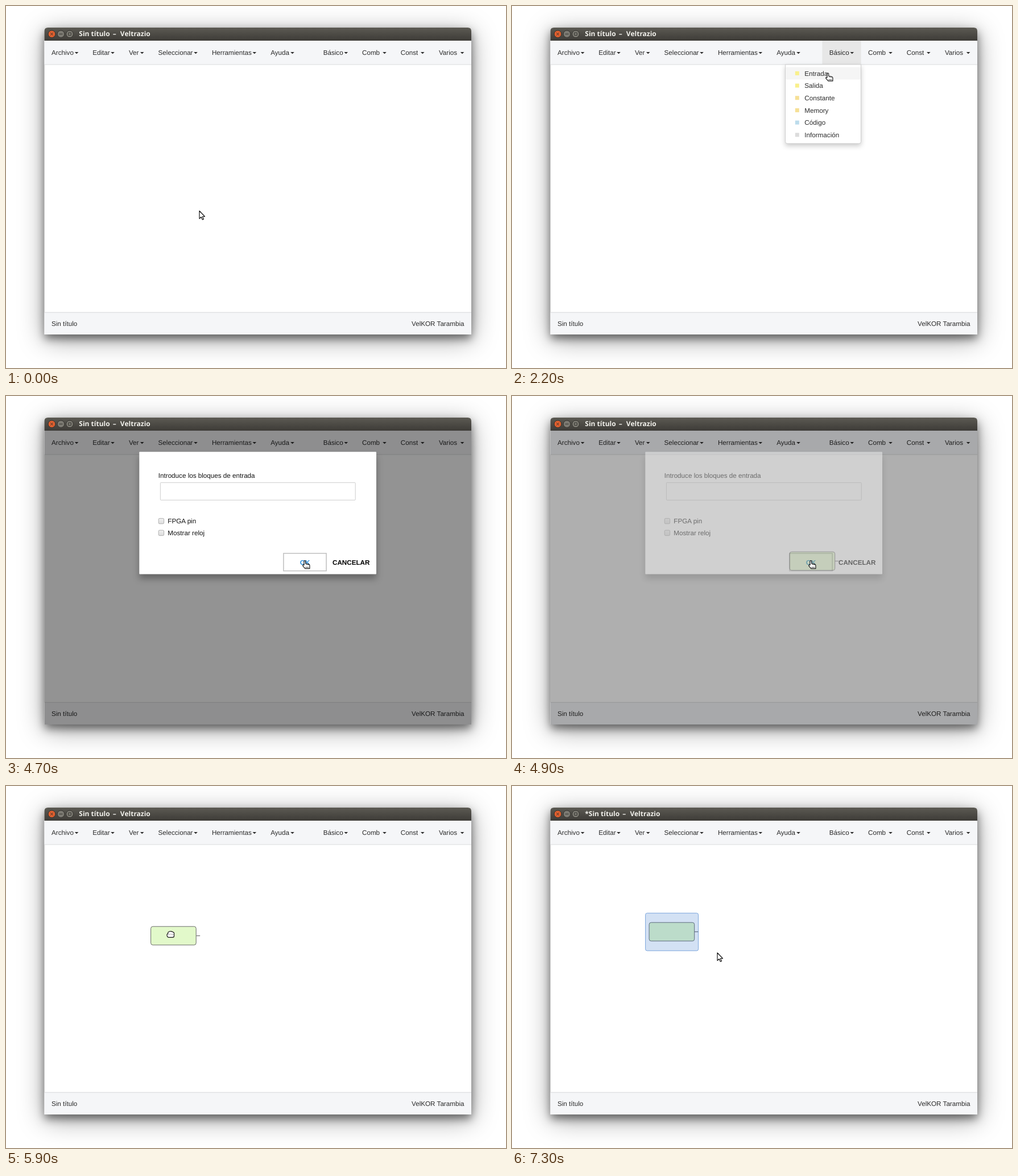
An HTML page for the animation above (8000 ms loop, 879x637 px).

```html
<!DOCTYPE html>
<html lang="es">
<head>
<meta charset="utf-8">
<title>Editor de bloques</title>
<style>
  html, body { margin: 0; width: 100%; height: 100%; overflow: hidden; background: #fff; }
  #shadow {
    position: absolute; left: 67.5px; top: 38px; width: 750.5px; height: 540px;
    border-radius: 6px 6px 0 0;
    box-shadow: 0 7px 16px rgba(0, 0, 0, .5), 0 9px 46px rgba(0, 0, 0, .38);
  }
  svg { position: absolute; left: 0; top: 0; display: block; }
  text {
    font: 11.667px "Liberation Sans", Arial, sans-serif;
    text-rendering: geometricPrecision; white-space: pre; fill: #2b2b2b;
  }
  #title { font: bold 12px "Noto Sans", "Open Sans", sans-serif; fill: #f2f1ec; }
  #dropPanel { filter: drop-shadow(0 4px 4px rgba(0, 0, 0, .2)); }
  #panel { filter: drop-shadow(0 8px 6px rgba(0, 0, 0, .3)); }
  #modal text { fill: #111; }
  #modal .action { font-weight: bold; fill: #000; }
  #modal .ok { fill: #3090dc; }
  .check { fill: url(#checkFill); stroke: #a9a9a9; stroke-width: .9; }
  .pick { fill: rgba(35, 105, 200, .2); stroke: #6a9ad8; stroke-width: .85; }
  .cursor { fill: #fff; stroke: #111; stroke-width: 1.15; stroke-linejoin: round; }
</style>
</head>
<body>
<div id="shadow"></div>
<svg width="879" height="637" viewBox="0 0 879 637">
  <defs>
    <linearGradient id="barFill" x2="0" y2="1">
      <stop offset="0" stop-color="#5c5a53"/>
      <stop offset="1" stop-color="#3d3b37"/>
    </linearGradient>
    <linearGradient id="checkFill" x2="0" y2="1">
      <stop offset="0" stop-color="#f1f1f1"/>
      <stop offset="1" stop-color="#dcdcdc"/>
    </linearGradient>
  </defs>

  <!-- window -->
  <path d="M67.5 578V44q0-6 6-6H812q6 0 6 6V578Z" fill="#fff"/>
  <path d="M67.5 61V44q0-6 6-6H812q6 0 6 6V61Z" fill="url(#barFill)"/>
  <g stroke="#33322e" stroke-width="1">
    <circle cx="80.5" cy="49.3" r="6.3" fill="#e2602f"/>
    <circle cx="96.5" cy="49.3" r="6.3" fill="#7c7a72"/>
    <circle cx="112" cy="49.3" r="6.3" fill="#7c7a72"/>
    <path d="M78.2 47l4.6 4.6m0-4.6l-4.6 4.6M93.6 49.3h5.8M109.7 47h4.6v4.6h-4.6z" fill="none"/>
  </g>
  <text id="title" x="128.3" y="53.2"><tspan id="star"></tspan>Sin título<tspan dx="2"> –</tspan><tspan dx="4"> Veltrazio</tspan></text>
  <rect x="67.5" y="61" width="750.5" height="42" fill="#f5f6f8"/>
  <rect x="67.5" y="102.6" width="750.5" height=".9" fill="#d6d7d9"/>
  <rect x="67.5" y="539" width="750.5" height="39" fill="#f5f6f8"/>
  <rect x="67.5" y="538.7" width="750.5" height=".9" fill="#d3d4d6"/>
  <rect id="menuLit" x="545.4" y="61" width="68.2" height="42" fill="#e7e7e7"/>
  <g id="menu"></g>
  <text x="80" y="562.8">Sin título</text>
  <text x="805.5" y="562.8" text-anchor="end">VelKOR Tarambia</text>

  <!-- block -->
  <g id="block">
    <path d="M80 16.5H86.7" stroke="#777" stroke-width="1.3"/>
    <rect x=".1" y=".2" width="79.6" height="32.6" rx="3.6" fill="#e2f9ca" stroke="#5c5c5c" stroke-width=".9"/>
  </g>
  <rect id="picked" class="pick" x="234.6" y="223.7" width="93" height="66.2" rx="3"/>
  <rect id="lasso" class="pick" x="193" y="213"/>

  <g id="drop">
    <path id="dropPanel" d="M480.6 103V238.7q0 3.3 3.3 3.3H610.2q3.3 0 3.3-3.3V103Z" fill="#fff" stroke="#c4c4c4" stroke-width=".8"/>
    <rect id="itemLit" x="481" y="107.7" width="132" height="21.6" fill="#f5f5f5"/>
  </g>

  <!-- dialog -->
  <rect id="dim" x="67.5" y="61" width="750.5" height="517"/>
  <g id="modal">
    <rect id="panel" x="234.3" y="98.3" width="416.7" height="215.2" rx="1" fill="#fff"/>
    <text x="267.8" y="144.3">Introduce los bloques de entrada</text>
    <rect id="field" x="271.4" y="152.4" width="342.8" height="30.8" rx="1" fill="#fff"/>
    <path id="caret" d="M279 161V174.5" stroke="#000"/>
    <rect class="check" x="268.2" y="215.4" width="9.4" height="9.4" rx="1.8"/>
    <rect class="check" x="268.2" y="236.2" width="9.4" height="9.4" rx="1.8"/>
    <path id="tick" d="M270.3 220.2l2 2.2 3.6-5" fill="none" stroke="#333" stroke-width="1.8"/>
    <text x="284.3" y="224.3">FPGA pin</text>
    <text x="284.3" y="245.2">Mostrar reloj</text>
    <rect id="okRing" x="487.9" y="276.9" width="75.2" height="30.8" fill="none" stroke="#c3c3c3" stroke-width="1.6"/>
    <text class="action ok" x="525.6" y="296.8" text-anchor="middle">OK</text>
    <text class="action" x="574" y="296.8">CANCELAR</text>
  </g>

  <!-- pointers, each drawn from its top left corner -->
  <path id="arrow" class="cursor" d="M.5 .5V14.2L3.7 11.3 5.8 16 7.9 15.1 5.9 10.5H10Z"/>
  <g id="hand" class="cursor">
    <path d="M3 8.6V2a1.3 1.3 0 0 1 2.7 0V6l5.2.9q2 .5 2 2.4V14.6H4.8L.8 9.9q-.3-1.7 1.2-1.8Z"/>
    <path d="M5.2 12.4H11.3M7.8 6.6V8.6M10.2 7V8.9" stroke-width=".8"/>
  </g>
  <g id="grab" class="cursor">
    <path d="M1 7q0-1.7 1.7-1.7V3.2q.2-1.4 1.7-1.2 1-1.6 2.6-.8 1.3-.8 2.5.4 1.5-.6 2.3.9 1.7 0 1.7 1.7V9q0 2.6-2.6 2.6H4Q1 11.2 1 7Z"/>
    <path d="M4.5 6.3h.1M7 6h.1M9.4 6.2h.1M11.6 6.5h.1" stroke-width=".9" stroke-linecap="round"/>
  </g>
  <g id="ibeam" fill="none">
    <path d="M-3.2-6.2H-1L0-5.4 1-6.2H3.2M0-5.4V5.4M-3.2 6.2H-1L0 5.4 1 6.2H3.2" stroke="#fff" stroke-width="3"/>
    <path d="M-3.2-6.2H-1L0-5.4 1-6.2H3.2M0-5.4V5.4M-3.2 6.2H-1L0 5.4 1 6.2H3.2" stroke="#111" stroke-width="1.4"/>
  </g>
</svg>
<script>
const LOOP = 8000, STEP = 100;
const $ = id => document.getElementById(id);

function add(parent, tag, attrs, text = '') {
  const el = document.createElementNS('http://www.w3.org/2000/svg', tag);
  for (const key in attrs) el.setAttribute(key, attrs[key]);
  el.textContent = text;
  parent.append(el);
}

// label, text x, caret x
[['Archivo', 80, 120.8], ['Editar', 152.2, 184.2], ['Ver', 215.9, 235.9],
 ['Seleccionar', 267.6, 330.2], ['Herramientas', 361.9, 433.5], ['Ayuda', 465.2, 500.2],
 ['Básico', 557.7, 594.5], ['Comb', 626, 662.2], ['Const', 693.8, 729], ['Varios', 760.9, 798.8]
].forEach(([label, x, caretX]) => {
  add($('menu'), 'text', { x, y: 85.8 }, label);
  add($('menu'), 'path', { d: `M${caretX} 81h6.6l-3.3 3.3z`, fill: '#2b2b2b' });
});

[['Entrada', '#f9f08c'], ['Salida', '#f9f08c'], ['Constante', '#f6e096'],
 ['Memory', '#f6e096'], ['Código', '#bcdcec'], ['Información', '#dcdcdc']
].forEach(([label, fill], i) => {
  const y = 118.4 + i * 21.67;
  add($('drop'), 'rect', { x: 497.8, y: y - 3.5, width: 7, height: 7, fill });
  add($('drop'), 'text', { x: 514.3, y: y + 4.2 }, label);
});

// Stops: rest from, rest until, x, y, pointer. Between rests the part glides.
const pointerStops = [
  [0, 200, 339.5, 360, 'arrow'], [1100, 1100, 577, 103.5, 'arrow'],
  [1200, 1200, 579, 97, 'hand'], [1500, 1700, 579, 79, 'hand'], [2200, 2800, 551, 117.3, 'hand'],
  [2900, 2900, 503.5, 170, 'ibeam'], [3000, 3100, 424.5, 190, 'arrow'],
  [3400, 4000, 281, 220, 'arrow'], [4300, 4400, 484, 288, 'arrow'],
  [4500, 4600, 513, 289, 'hand'], [4700, 5100, 521, 289, 'hand'],
  [5200, 6100, 0, 0, 'grab'], [6200, 6200, 275, 247, 'hand'],
  [6300, 6300, 229, 228, 'arrow'], [6400, 6800, 193, 213, 'arrow'],
  [6900, 6900, 268, 244, 'arrow'], [7000, 7100, 350, 278, 'arrow'], [7200, LOOP, 360.5, 293, 'arrow']
];
const blockStops = [
  [4900, 5100, 488, 274], [5200, 5300, 434.5, 274], [5400, 5400, 365, 271],
  [5500, 5600, 294, 267], [5700, 5800, 268, 253], [5900, 5900, 254.5, 247], [6000, LOOP, 241, 240]
];

function sample(stops, t) {
  let i = stops.length - 1;
  while (i > 0 && stops[i][0] > t) i--;
  const [, until, x, y, kind] = stops[i];
  if (t <= until) return { x, y, kind };
  const [start, , nx, ny] = stops[i + 1];
  const u = (t - until) / (start - until), e = u * u * (3 - 2 * u);
  return { x: x + (nx - x) * e, y: y + (ny - y) * e, kind };
}

const show = (id, on) => { $(id).style.display = on ? '' : 'none'; };
const place = (id, { x, y }) => $(id).setAttribute('transform', `translate(${x} ${y})`);

function draw(t) {
  const within = (from, to) => t >= from && t < to;
  const block = sample(blockStops, t);
  const pointer = sample(pointerStops, t);
  if (pointer.kind === 'grab') {
    pointer.x = block.x + 27.5;
    pointer.y = block.y + 7.8;
  }
  for (const kind of ['arrow', 'hand', 'grab', 'ibeam']) show(kind, kind === pointer.kind);
  place(pointer.kind, pointer);

  show('block', t >= 4900);
  place('block', block);
  show('menuLit', within(1400, 2900));
  show('drop', within(1400, 2900));
  show('itemLit', t >= 2000);

  const fading = t >= 4900;
  show('dim', within(2900, 5000));
  show('modal', within(2900, 5000));
  $('dim').setAttribute('fill-opacity', fading ? .315 : .425);
  $('modal').setAttribute('opacity', fading ? .42 : 1);
  const focused = t < 3800;
  $('field').setAttribute('stroke', focused ? '#bdbdbd' : '#c8c8c8');
  $('field').setAttribute('stroke-width', focused ? 1.7 : .9);
  show('caret', t < 3600);
  show('tick', focused);
  show('okRing', t >= 4700);

  $('star').textContent = t >= 6200 ? '*' : '';
  show('lasso', within(6900, 7300));
  $('lasso').setAttribute('width', Math.max(0, pointer.x - 193));
  $('lasso').setAttribute('height', Math.max(0, pointer.y - 213));
  show('picked', t >= 7300);
}

const begin = performance.now();
function tick() {
  const t = (performance.now() - begin) % LOOP;
  draw(Math.floor(t / STEP) * STEP);
  requestAnimationFrame(tick);
}
tick();
</script>
</body>
</html>
```
